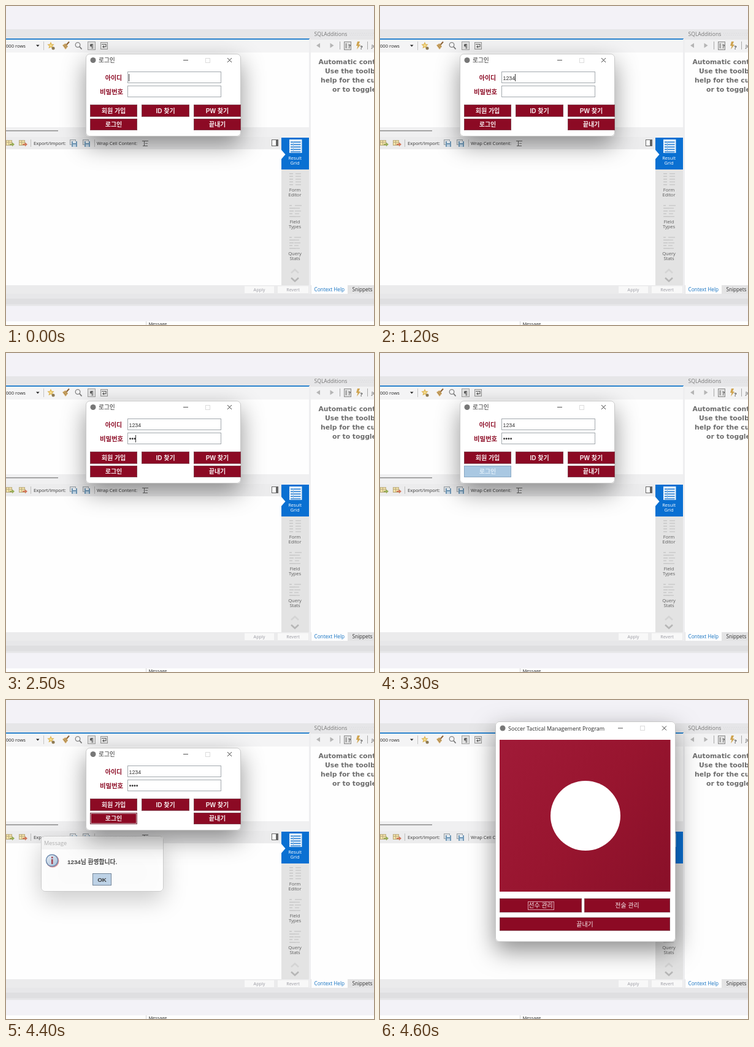
An HTML page with a canvas for the animation above (4.7 s loop, 600 by 521 pixels).

```html
<!DOCTYPE html>
<html lang="ko">
<head>
<meta charset="utf-8">
<title>로그인</title>
<style>
html, body { margin: 0; width: 100%; height: 100%; overflow: hidden; background: #f3f2f7; }
canvas { display: block; width: 600px; height: 521px; }
</style>
</head>
<body>
<canvas id="stage" width="600" height="521"></canvas>
<script>
const ctx = document.getElementById('stage').getContext('2d');
const LOOP = 4700;
const UI = '"Open Sans", "Noto Sans CJK KR", "Noto Sans CJK", sans-serif';
const SWING = '"Liberation Sans", "Noto Sans CJK KR", "Noto Sans CJK", sans-serif';
const HELP = '"DejaVu Sans", sans-serif';
const RED = '#8c0a24';

// Times of the user's actions, in ms
const ID_KEYS = [600, 800, 950, 1100];
const PW_FOCUS = 1600;
const PW_KEYS = [2000, 2250, 2450, 2650];
const PRESS = 3200, RELEASE = 3400;
const DIALOG = 3500, OK_PRESS = 4300, CLOSING = 4400, MAIN = 4500;

function rect(x, y, w, h, color) {
  ctx.fillStyle = color;
  ctx.fillRect(x, y, w, h);
}

function frame(x, y, w, h, color) {
  ctx.strokeStyle = color;
  ctx.lineWidth = 1;
  ctx.strokeRect(x + .5, y + .5, w - 1, h - 1);
}

function line(color, width, ...p) {
  ctx.strokeStyle = color;
  ctx.lineWidth = width;
  ctx.beginPath();
  for (let i = 0; i < p.length; i += 2) ctx.lineTo(p[i], p[i + 1]);
  ctx.stroke();
}

function poly(color, ...p) {
  ctx.fillStyle = color;
  ctx.beginPath();
  for (let i = 0; i < p.length; i += 2) ctx.lineTo(p[i], p[i + 1]);
  ctx.fill();
}

function disc(x, y, r, color) {
  ctx.fillStyle = color;
  ctx.beginPath();
  ctx.arc(x, y, r, 0, Math.PI * 2);
  ctx.fill();
}

function ring(x, y, r, color, width) {
  ctx.strokeStyle = color;
  ctx.lineWidth = width;
  ctx.beginPath();
  ctx.arc(x, y, r, 0, Math.PI * 2);
  ctx.stroke();
}

function text(str, x, y, size, color, family = UI, weight = 400, align = 'left') {
  ctx.font = `${weight} ${size}px ${family}`;
  ctx.textAlign = align;
  ctx.fillStyle = color;
  ctx.fillText(str, x, y);
}

function star(x, y, r, color) {
  const p = [];
  for (let i = 0; i < 10; i++) {
    const a = i * Math.PI / 5 - Math.PI / 2, k = i % 2 ? r * .45 : r;
    p.push(x + k * Math.cos(a), y + k * Math.sin(a));
  }
  poly(color, ...p);
}

// ---- editor behind the windows ----

function gridIcon(x, arrow) {
  rect(x, 219, 10, 9, '#f3e2a8');
  frame(x, 219, 10, 9, '#b9ab80');
  line('#b9ab80', 1, x, 222.5, x + 10, 222.5);
  line('#b9ab80', 1, x + 4.5, 219, x + 4.5, 228);
  poly(arrow, x + 6, 225, x + 10, 225, x + 10, 222.5, x + 14, 226, x + 10, 229.5, x + 10, 227, x + 6, 227);
}

function diskIcon(x) {
  rect(x - 6, 218, 10, 9, '#dde0e3');
  frame(x - 6, 218, 10, 9, '#9aa1a6');
  rect(x - 3, 221, 9, 9, '#7199b8');
  rect(x - 1, 221, 5, 3, '#e6eef4');
  rect(x - 1, 226, 5, 4, '#c3d6e5');
}

function topIcons() {
  poly('#222', 49, 63.5, 54.5, 63.5, 51.75, 66.5);
  line('#c4c4c4', 1, 61.5, 58, 61.5, 72);
  star(73, 64.5, 6, '#d9ae48');
  star(73, 64.5, 3.5, '#f5dc8c');
  disc(77, 69, 2.5, '#8d7a54');
  line('#8a6238', 2, 98, 64, 103, 58.5);
  poly('#d2a864', 92, 64, 97, 61, 101, 66, 97, 71);
  line('#957a4c', 1, 94, 64, 98, 69);
  line('#957a4c', 1, 96, 62.5, 100, 67);
  ring(117, 63.5, 3.8, '#858585', 1.3);
  line('#777', 1.8, 120, 66.5, 123.5, 70.5);
  rect(133, 58, 13, 14, '#e2e2e2');
  frame(133, 58, 13, 14, '#a2a2a2');
  text('¶', 139.5, 68.5, 9.5, '#555', UI, 700, 'center');
  rect(154, 59, 12, 12, '#e8e8e8');
  frame(154, 59, 12, 12, '#959595');
  line('#666', 1.2, 156, 62.5, 163, 62.5, 163, 66.5, 159, 66.5);
  poly('#666', 157, 66.5, 160, 64, 160, 69);
}

function resultTools() {
  gridIcon(0, '#98ad58');
  gridIcon(21, '#d2785c');
  line('#bdbdbd', 1, 40.5, 218, 40.5, 230);
  text('Export/Import:', 45, 227, 7.7, '#333');
  diskIcon(110);
  diskIcon(131);
  line('#bdbdbd', 1, 144.5, 218, 144.5, 230);
  text('Wrap Cell Content:', 148, 227, 7.6, '#333');
  line('#666', 1, 222, 220.5, 232, 220.5);
  line('#666', 1, 225.5, 221, 225.5, 228);
  line('#888', 1, 227, 224.5, 231, 224.5);
  line('#666', 1, 223, 228.5, 231, 228.5);
  rect(433, 218, 11, 11, '#fff');
  frame(433, 218, 11, 11, '#666');
  rect(440, 218, 4, 11, '#666');
}

function sideLabel(a, b, y, color) {
  text(a, 471, y, 7.5, color, UI, 400, 'center');
  text(b, 471, y + 7.5, 7.5, color, UI, 400, 'center');
}

function sideItem(y, a, b, kind) {
  for (let i = 0; i < 5; i++) {
    const yy = y + 2 + i * 4.5;
    rect(462, yy, kind ? 4 + (i * 5) % 7 : 6, 1.6, '#c8c8c8');
    rect(472 - kind, yy, kind ? 11 - (i * 3) % 5 : 9, 1.6, '#cccccc');
  }
  sideLabel(a, b, y + 32, '#5c5c5c');
}

function sidebar() {
  rect(449, 215, 45, 241, '#e3e3e3');
  rect(449, 215, 45, 52, '#0a70d2');
  poly('#fff', 449, 235, 455.5, 242.5, 449, 250);
  rect(462, 218, 20.5, 22, '#eaf3fb');
  for (let y = 221.5; y < 239; y += 4) rect(464, y, 16.5, 1.6, '#2a80d4');
  rect(468, 221, 1, 17, '#8fbce6');
  sideLabel('Result', 'Grid', 251, '#fff');
  sideItem(271, 'Form', 'Editor', 0);
  sideItem(323, 'Field', 'Types', 1);
  sideItem(375, 'Query', 'Stats', 2);
  line('#d4d4d4', 2.6, 465, 436, 471, 430.5, 477, 436);
  line('#b6b6b6', 2.6, 465, 444, 471, 449.5, 477, 444);
}

function helpPanel() {
  rect(497, 55, 103, 21, '#f2f2f3');
  rect(497, 76, 103, 380, '#fefefe');
  text('SQLAdditions', 502.5, 49, 8.6, '#777');
  for (let x = 560; x < 600; x += 3) {
    rect(x, 44, 1, 1, '#d6d6d9');
    rect(x + 1, 47, 1, 1, '#d6d6d9');
  }
  poly('#b5b5b5', 506, 64.5, 512, 60.5, 512, 68.5);
  poly('#b5b5b5', 534.5, 64.5, 528.5, 60.5, 528.5, 68.5);
  line('#a8a8a8', 1, 544.5, 58, 544.5, 71);
  rect(551, 58, 12, 14, '#dedede');
  frame(551, 58, 12, 14, '#8d8d8d');
  line('#666', 1, 554.5, 61, 554.5, 69);
  text('?', 560, 69, 8.5, '#555', UI, 700, 'center');
  poly('#cfa450', 573, 58, 577, 58, 575, 63, 578, 63, 572, 71, 573.5, 65, 571, 65);
  text('?', 579.5, 71, 9, '#555', UI, 700, 'center');
  line('#a8a8a8', 1, 589.5, 58, 589.5, 71);
  text('Jump to', 596, 68, 8, '#333');
  text('Automatic context help is', 509.5, 95, 10.8, '#6c6c6c', HELP, 700);
  text('Use the toolbar to manually', 520, 110, 10.8, '#6c6c6c', HELP, 700);
  text('help for the current caret', 513, 125, 10.8, '#6c6c6c', HELP, 700);
  text('or to toggle automatic', 532, 140, 10.8, '#6c6c6c', HELP, 700);
  rect(497, 456, 103, 14, '#e3e3e4');
  rect(498, 456, 59, 14, '#fefefe');
  text('Context Help', 502.5, 466, 8.2, '#1673c2');
  text('Snippets', 564.5, 466, 8.2, '#333');
}

function editor() {
  rect(0, 0, 600, 521, '#f3f2f7');
  rect(0, 38, 600, 17, '#e6e6e8');
  rect(0, 53, 495, 2, '#2b84ce');
  rect(0, 55, 495, 21, '#f4f4f5');
  rect(0, 76, 495, 122, '#fefefe');
  rect(0, 198, 495, 16, '#f0f0f1');
  rect(0, 203, 85, 1.5, '#8d8d8d');
  rect(0, 214, 449, 20, '#ececed');
  rect(0, 234, 449, 222, '#fefefe');
  rect(0, 456, 495, 14, '#ebebec');
  rect(494, 54, 3, 416, '#eeeef0');
  rect(0, 470, 600, 20, '#e7e7e9');
  rect(0, 478, 600, 9, '#dfdfe1');
  rect(0, 515, 600, 6, '#fefefe');
  rect(228, 515, 1, 6, '#d5d5d5');
  text('000 rows', 0, 68, 7.6, '#222');
  text('Message', 232.5, 522, 7.3, '#222');
  topIcons();
  resultTools();
  sidebar();
  rect(389, 457.5, 48, 11.5, '#f8f8f8');
  rect(443, 457.5, 50, 11.5, '#f8f8f8');
  text('Apply', 413, 466, 7.2, '#9a9aa2', UI, 400, 'center');
  text('Revert', 468, 466, 7.2, '#9a9aa2', UI, 400, 'center');
  helpPanel();
}

// ---- windows ----

function panel(x, y, w, h, shade) {
  ctx.save();
  ctx.shadowColor = `rgba(0,0,0,${shade})`;
  ctx.shadowBlur = 38;
  ctx.shadowOffsetY = 14;
  ctx.fillStyle = '#fff';
  ctx.beginPath();
  ctx.roundRect(x, y, w, h, 6);
  ctx.fill();
  ctx.restore();
  ctx.strokeStyle = 'rgba(120,120,120,.4)';
  ctx.lineWidth = 1;
  ctx.beginPath();
  ctx.roundRect(x + .5, y + .5, w - 1, h - 1, 6);
  ctx.stroke();
}

function closeMark(x, y, color) {
  line(color, .9, x - 3.5, y - 3.5, x + 3.5, y + 3.5);
  line(color, .9, x + 3.5, y - 3.5, x - 3.5, y + 3.5);
}

function titleBar(x, y, right, title, size, active) {
  const c = active ? '#2a2a2a' : '#a0a0a0';
  disc(x + 12, y, 4.5, '#777');
  text(title, x + 21, y + 3.5, size, c);
  line(active ? '#555' : '#b0b0b0', 1, right - 94, y, right - 86, y);
  frame(right - 58, Math.round(y - 4), 8, 8, '#dcdcdc');
  closeMark(right - 18.5, y, c);
}

function button(x, y, w, h, label, opt = {}) {
  rect(x, y, w, h, opt.down ? '#a9c8e2' : RED);
  frame(x, y, w, h, opt.down ? '#8aa9c4' : '#84414f');
  if (opt.focus) frame(x + 1, y + 1, w - 2, h - 2, '#c9a0aa');
  const color = opt.down ? '#dcecf8' : '#f6eaec';
  text(label, x + w / 2, y + h / 2 + 3.5, 10, color, SWING, opt.weight || 700, 'center');
}

function field(y) {
  rect(198, y, 153, 19, '#fff');
  frame(198, y, 153, 19, '#a3a9ae');
}

const typed = (keys, t) => keys.filter(k => t >= k).length;

const lastKey = (keys, t, start) => keys.reduce((a, k) => t >= k ? k : a, start);

function caret(x, y, t, since) {
  if ((t - since) % 1000 < 500) rect(x, y, 1, 12, '#333');
}

function loginWindow(t) {
  const active = t < DIALOG || t >= CLOSING;
  panel(130, 78, 253, 135, active ? .42 : .25);
  titleBar(130, 88.5, 383, '로그인', 9.7, active);
  text('아이디', 175.5, 120.5, 9.9, RED, SWING, 700, 'center');
  text('비밀번호', 172, 143.5, 10.4, RED, SWING, 700, 'center');
  field(107);
  field(130);

  const id = '1234'.slice(0, typed(ID_KEYS, t));
  text(id, 200.5, 120.5, 8.9, '#333', SWING);
  const dots = typed(PW_KEYS, t);
  for (let i = 0; i < dots; i++) disc(202.5 + i * 3.7, 140, 1.4, '#333');
  if (t < PW_FOCUS) caret(200 + Math.round(id.length * 4.95), 111, t, lastKey(ID_KEYS, t, 0));
  else if (t < PRESS) caret(200 + Math.round(dots * 3.8), 134, t, lastKey(PW_KEYS, t, PW_FOCUS));

  button(137, 161, 77, 20, '회원 가입');
  button(221, 161, 78, 20, 'ID 찾기');
  button(306, 161, 77, 20, 'PW 찾기');
  button(137, 184, 77, 19, '로그인', { down: t >= PRESS && t < RELEASE, focus: t >= RELEASE });
  button(306, 184, 77, 19, '끝내기');
}

function messageDialog(t) {
  const closing = t >= CLOSING, down = t >= OK_PRESS;
  ctx.save();
  ctx.globalAlpha = closing ? .93 : 1;
  panel(57, 222, 200, 91, closing ? .22 : .42);
  if (closing) rect(58, 224, 198, 20, '#f3f3f3');
  text('Message', 62, 237, 9.1, closing ? '#aaa' : '#222');
  if (!closing) closeMark(244, 233, '#222');

  const g = ctx.createLinearGradient(66, 252, 84, 272);
  g.addColorStop(0, '#f4f8fc');
  g.addColorStop(1, '#a9c4dd');
  disc(76, 263, 10.5, '#d58d92');
  disc(75, 262, 10.3, '#6484ab');
  disc(75, 262, 8.8, g);
  rect(74, 256, 2.5, 2.5, '#a33b48');
  rect(74, 260, 2.5, 8, '#a33b48');
  text('1234님 환영합니다.', 100, 267.5, 9.8, '#3a3a3a', SWING, 700);

  const shade = ctx.createLinearGradient(0, 283, 0, 303);
  shade.addColorStop(0, '#dde8f3');
  shade.addColorStop(.4, '#fff');
  shade.addColorStop(1, '#b8cfe5');
  rect(141, 283, 31, 20, down ? '#b8cfe5' : shade);
  frame(141, 283, 31, 20, '#6f8296');
  if (!down) {
    frame(142, 284, 29, 18, '#a3b8cc');
    frame(148, 287, 17, 12, '#a3b8cc');
  }
  text('OK', 156.5, 297, 9.8, '#333', SWING, 700, 'center');
  ctx.restore();
}

function mainWindow() {
  panel(188, 35, 294, 360, .45);
  titleBar(188, 46, 482, 'Soccer Tactical Management Program', 9, true);
  const g = ctx.createLinearGradient(195, 90, 473, 290);
  g.addColorStop(0, '#a01a37');
  g.addColorStop(.5, '#98152f');
  g.addColorStop(1, '#8a1029');
  rect(195, 65, 278.5, 248, g);
  disc(335, 189, 57, '#fff');
  button(195, 324, 134, 23, '선수 관리', { weight: 500 });
  frame(241, 329, 43, 14, '#d8a0ac');
  button(333, 324, 140, 23, '전술 관리', { weight: 500 });
  button(195, 355, 278, 22, '끝내기', { weight: 500 });
}

function draw() {
  const t = performance.now() % LOOP;
  editor();
  if (t >= MAIN) {
    mainWindow();
  } else {
    // The active window lies on top, so its shadow falls on the other one
    if (t >= CLOSING) messageDialog(t);
    loginWindow(t);
    if (t >= DIALOG && t < CLOSING) messageDialog(t);
  }
  requestAnimationFrame(draw);
}
draw();
</script>
</body>
</html>
```
